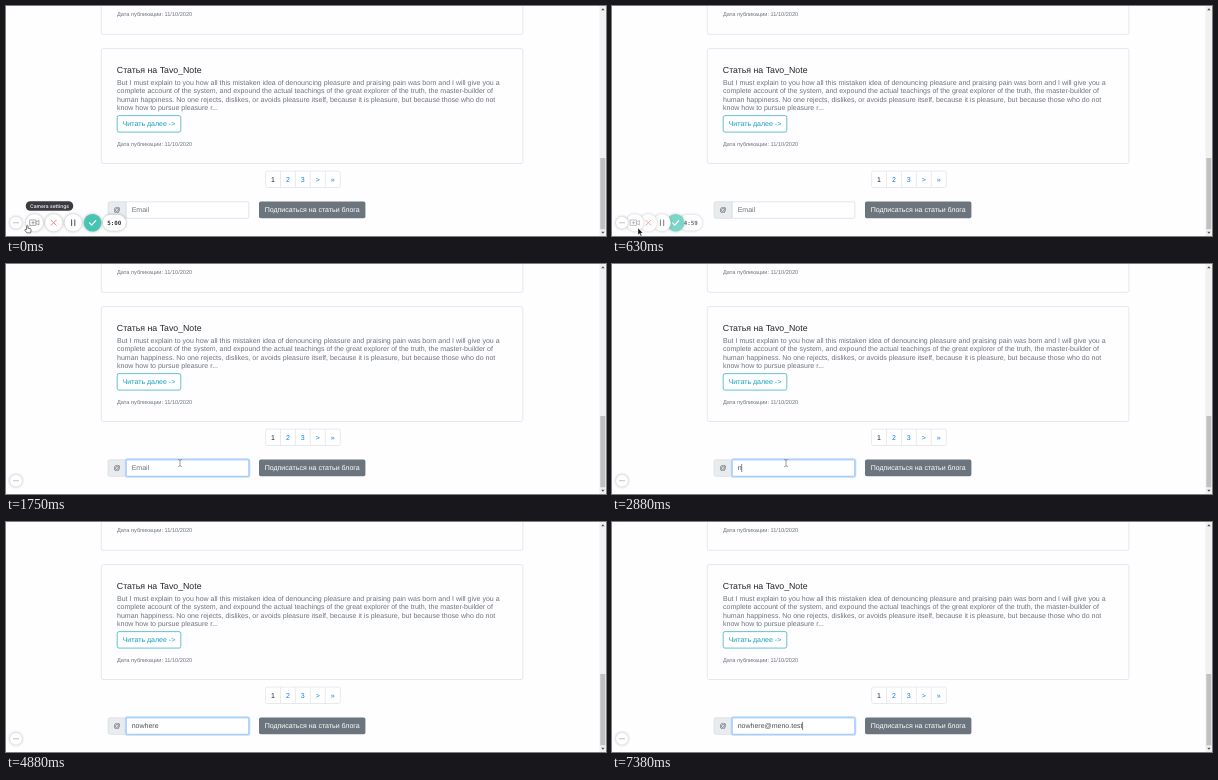
These frames come from a looping animation (600x230 px, 8000 ms). An HTML page:

```html
<!DOCTYPE html>
<html lang="ru">
<head>
<meta charset="utf-8">
<title>Subscribe form</title>
<style>
  html, body { margin: 0; width: 100%; height: 100%; overflow: hidden; background: #fefdff; }
  svg { display: block; width: 600px; height: 230px; }
  text { font: 7.03px "Liberation Sans", Arial, sans-serif; fill: #6c757d; text-rendering: geometricPrecision; white-space: pre; }
  .title { font-size: 8.785px; fill: #212529; }
  .date { font-size: 5.62px; }
  .mid { text-anchor: middle; }
  .link { fill: #007bff; }
  .dark { fill: #495057; }
  .card { fill: none; stroke: #d9d9dd; stroke-width: .6; }
  .tip { font: 500 5px Inter, sans-serif; fill: #fff; }
  .clock { font: bold 5.8px "DejaVu Sans Mono", monospace; fill: #33333d; }
  .line { fill: none; stroke-linecap: round; stroke-linejoin: round; }
  .float { filter: drop-shadow(0 .6px 1.4px rgba(0, 0, 0, .32)); fill: #fff; }
</style>
</head>
<body>
<svg viewBox="0 0 600 230">
  <rect width="600" height="230" fill="#fefdff"/>

  <!-- posts -->
  <rect class="card" x="95.3" y="-40" width="421.6" height="68.3" rx="1.8"/>
  <text class="date" x="111" y="10.2">Дата публикации: 11/10/2020</text>
  <rect class="card" x="95.3" y="42.6" width="421.6" height="114.9" rx="1.8"/>
  <text class="title" x="110.8" y="67.4">Статья на Tavo_Note</text>
  <text x="111" y="78.8">But I must explain to you how all this mistaken idea of denouncing pleasure and praising pain was born and I will give you a</text>
  <text x="111" y="87.2">complete account of the system, and expound the actual teachings of the great explorer of the truth, the master-builder of</text>
  <text x="111" y="95.7">human happiness. No one rejects, dislikes, or avoids pleasure itself, because it is pleasure, but because those who do not</text>
  <text x="111" y="104.1">know how to pursue pleasure r...</text>
  <rect x="111.2" y="109.6" width="63.6" height="16.5" rx="1.8" fill="none" stroke="#17a2b8" stroke-width=".65"/>
  <text x="116.7" y="120.2" style="fill:#17a2b8">Читать далее -&gt;</text>
  <text class="date" x="111" y="139.5">Дата публикации: 11/10/2020</text>

  <!-- pagination -->
  <rect x="259.6" y="165.1" width="74.7" height="16.4" rx="1.8" fill="#fff" stroke="#dee2e6" stroke-width=".7"/>
  <path d="M274.5 165v16.5m14.9-16.5v16.5m14.9-16.5v16.5m15-16.5v16.5" stroke="#dee2e6" stroke-width=".7"/>
  <text class="mid" x="267" y="175.8" style="fill:#212529">1</text>
  <text class="mid link" x="281.9" y="175.8">2</text>
  <text class="mid link" x="296.8" y="175.8">3</text>
  <text class="mid link" x="311.8" y="175.8">&gt;</text>
  <text class="mid link" x="326.8" y="175.8">»</text>

  <!-- form -->
  <path d="M120.3 195.8H103.9q-1.8 0-1.8 1.8v12.9q0 1.8 1.8 1.8h16.4z" fill="#e9ecef" stroke="#ced4da" stroke-width=".6"/>
  <text class="mid dark" x="111" y="206.4">@</text>
  <rect id="ring" x="119.4" y="195" width="124.2" height="18.1" rx="2.2" fill="none" stroke="#bfdeff" stroke-width="1.4"/>
  <rect x="120.2" y="195.8" width="122.6" height="16.5" rx="1.4" fill="#fff" stroke="#ced4da" stroke-width=".6"/>
  <rect id="edge" x="120.2" y="195.8" width="122.6" height="16.5" rx="1.4" fill="none" stroke="#80bdff" stroke-width=".7"/>
  <text id="hint" x="125.7" y="206.4">Email</text>
  <text id="field" class="dark" x="125.7" y="206.4"></text>
  <rect id="caret" y="200" width=".6" height="8" fill="#33383d"/>
  <rect x="253" y="195.6" width="106.4" height="16.7" rx="1.8" fill="#6c757d"/>
  <text x="258.7" y="206.4" style="fill:#fff">Подписаться на статьи блога</text>

  <!-- scrollbar -->
  <rect x="593.5" width="6.5" height="230" fill="#f1f1f1"/>
  <rect x="594.3" y="152" width="5" height="71.3" fill="#c1c1c1"/>
  <path d="M595.2 4.3h3.4l-1.7-2z" fill="#505050"/>
  <path d="M595.2 225.8h3.4l-1.7 2z" fill="#505050"/>

  <!-- recorder bar -->
  <g id="bar">
    <g data-x="108.3">
      <rect class="float" x="-11.5" y="-8" width="23" height="16" rx="8"/>
      <text id="clock" class="clock mid" y="2.2">5:00</text>
    </g>
    <g data-x="86.6">
      <circle class="float" r="8.8" style="fill:#46c6b2"/>
      <path class="line" d="M-3 .2l2.1 2.2 4-4.4" stroke="#fff" stroke-width="1.2"/>
    </g>
    <g data-x="67.2">
      <circle class="float" r="8.7"/>
      <path class="line" d="M-1.6-2.8v5.6m3.2-5.6v5.6" stroke="#5b5b6b" stroke-width="1.1"/>
    </g>
    <g data-x="47.7">
      <circle class="float" r="8.7"/>
      <path class="line" d="M-2.5-2.5l5 5m0-5l-5 5" stroke="#e58a8a" stroke-width="1"/>
    </g>
    <g data-x="28.5">
      <circle class="float" r="8.7"/>
      <path class="line" d="M-4.4-2.7h5.8v5.4h-5.8zM1.4-.6l3-1.7v4.6l-3-1.7M-1.5-1.2v2.4m-1.2-1.2h2.4" stroke="#85858f" stroke-width=".7"/>
    </g>
  </g>
  <circle class="float" cx="10" cy="216.8" r="6"/>
  <path class="line" d="M8 216.8h.01m1.99 0h.01m1.99 0h.01" stroke="#6a6a74" stroke-width="1.1"/>
  <g id="tipCamera">
    <rect x="19.8" y="195.2" width="47.4" height="9.6" rx="4.6" fill="#3a3a40"/>
    <text class="tip mid" x="43.5" y="201.7">Camera settings</text>
  </g>
  <g id="tipHide">
    <rect x="4.6" y="195.2" width="32.8" height="9.6" rx="4.6" fill="#3a3a40"/>
    <text class="tip mid" x="21" y="201.7">Hide Menu</text>
  </g>

  <!-- pointers -->
  <g id="pointer">
    <path id="hand" d="M-1.2.6V-3.2q.7-1 1.4 0v2.4l2.6.7q.6.3.5 1L2.8 3.9H-.9L-3 1.2q0-1 .9-.8z" fill="#fff" stroke="#222" stroke-width=".6" stroke-linejoin="round"/>
    <path id="arrow" d="M0 0v7l1.6-1.5 1.1 2.6 1.1-.5-1.1-2.5h2.2z" fill="#111" stroke="#fff" stroke-width=".4"/>
    <path id="beam" class="line" d="M-1.5-3.5q1.5 0 1.5.8v5.4q0 .8-1.5.8M1.5-3.5Q0-3.5 0-2.7m0 5.4q0 .8 1.5.8" stroke="#777" stroke-width=".7"/>
  </g>
</svg>
<script>
const LOOP = 8000;
const ADDRESS = 'nowhere@meno.test';
const $ = id => document.getElementById(id);

// [time, x, y, shape]
const POINTER = [
  [0, 21.8, 223, 'hand'], [130, 16, 223.2, 'hand'], [250, 11.8, 223.6, 'hand'],
  [630, 26, 222, 'arrow'], [750, 75, 215, 'arrow'], [880, 130, 207, 'beam'],
  [1000, 166, 203, 'beam'], [1130, 176, 201, 'beam'], [1380, 174.5, 199.6, 'beam'],
  [1500, 174, 199, 'beam'], [3000, 0, 0, 'none']
];
// [time, openness]
const BAR = [[0, 1], [630, .7], [750, .3], [880, 0]];
// [time, typed letters, caret visible]
const TYPING = [
  [0, 0, 0], [1130, 0, 1], [1750, 0, 0], [2250, 0, 1],
  [2880, 1, 1], [3130, 2, 1], [3380, 3, 1], [3880, 3, 0],
  [4000, 4, 1], [4130, 5, 1], [4250, 6, 1], [4380, 7, 1], [4880, 7, 0],
  [5000, 8, 1], [5630, 8, 0], [5750, 9, 1], [6130, 10, 1],
  [6380, 11, 1], [6500, 12, 1], [6630, 13, 1],
  [6880, 14, 1], [7000, 15, 1], [7130, 16, 1], [7380, 17, 1]
];

const at = (rows, t) => rows.findLast(row => row[0] <= t);
const show = (id, on) => $(id).style.display = on ? '' : 'none';

function drawBar(t) {
  const [, open] = at(BAR, t);
  show('bar', open > 0);
  $('bar').style.opacity = open;
  for (const item of $('bar').children) {
    const x = 10 + (item.dataset.x - 10) * open;
    item.setAttribute('transform', `translate(${x} 216.7)`);
  }
  $('clock').textContent = t < 250 ? '5:00' : '4:59';
  show('tipCamera', t < 250);
  show('tipHide', t >= 250 && t < 630);
}

function drawPointer(t) {
  const [, x, y, shape] = at(POINTER, t);
  $('pointer').setAttribute('transform', `translate(${x} ${y})`);
  for (const id of ['hand', 'arrow', 'beam']) show(id, id === shape);
}

function drawField(t) {
  const [, count, caret] = at(TYPING, t);
  const focus = Math.min(1, Math.max(0, (t - 1150) / 150));
  $('ring').style.opacity = $('edge').style.opacity = focus;
  $('field').textContent = ADDRESS.slice(0, count);
  show('hint', !count);
  show('caret', caret);
  const width = count ? $('field').getComputedTextLength() : 0;
  $('caret').setAttribute('x', 125.6 + width);
}

function frame() {
  const t = performance.now() % LOOP;
  drawBar(t);
  drawField(t);
  drawPointer(t);
  requestAnimationFrame(frame);
}
frame();
</script>
</body>
</html>
```
